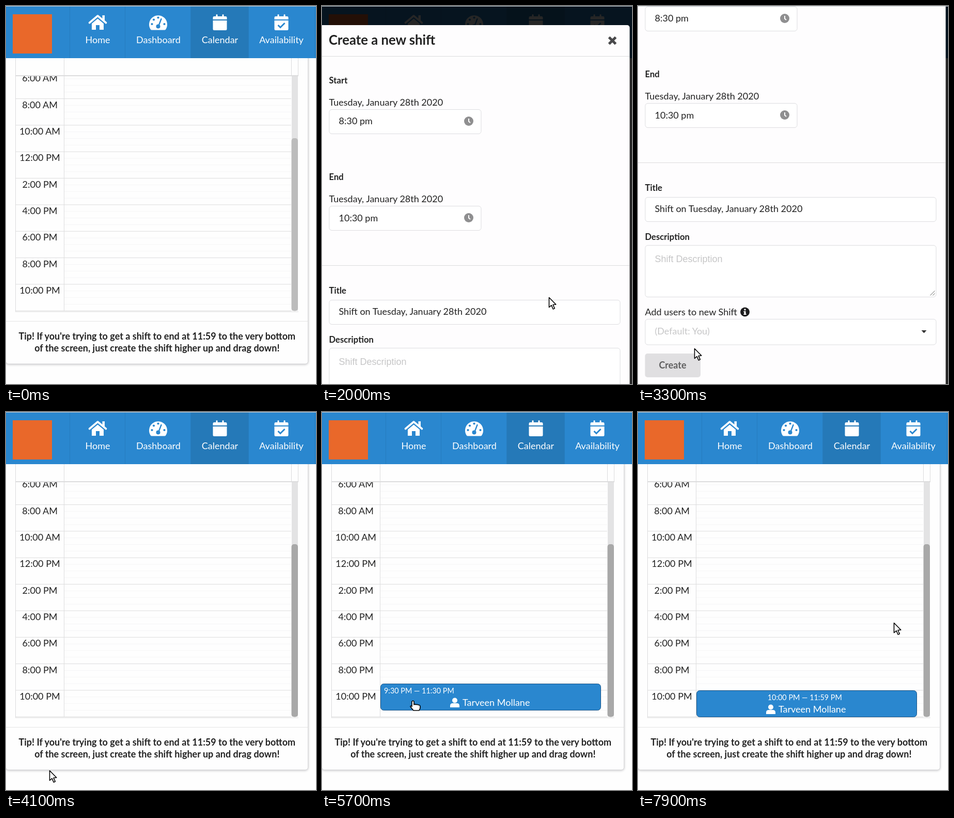
An HTML page that plays this animation: 600x732 px, repeating every 8000 ms.

```html
<!DOCTYPE html>
<html lang="en">
<head>
<meta charset="utf-8">
<title>Creating a shift</title>
<style>
  html, body { margin: 0; width: 100%; height: 100%; overflow: hidden; background: #fefefe; }
  svg { display: block; width: 600px; height: 732px; }
  text { font: 18px Lato, Carlito, sans-serif; fill: #222; white-space: pre; }
  .mid { text-anchor: middle; }
  .bold { font-weight: 700; }
  .label { font-size: 16.7px; font-weight: 700; }
  .title { font-size: 25.7px; font-weight: 700; }
  .hint { fill: #c6c6c7; }
  .area { font-family: "Liberation Sans", Arial, sans-serif; }
  .white text, text.white { fill: #fff; }
  .white { fill: #fff; }
  .blue { fill: #2a87cf; }
  .rule { stroke: #dcdcdd; fill: none; }
  .slot { stroke: #f5f5f6; }
  .field { fill: #fff; stroke: #dddde0; }
  .tool { fill: #fff; stroke: #000; stroke-width: 1.6; stroke-linejoin: round; }
  #card { filter: drop-shadow(0 1px 2px #c4c4c6); }
  #range { font-size: 13.5px; }
  #when { font-size: 14.4px; }
</style>
</head>
<body>
<svg viewBox="0 0 600 732">
  <defs>
    <g id="clock">
      <circle r="9" fill="#8f8f90"/>
      <path d="M0-5V.5L3 3" fill="none" stroke="#fff" stroke-width="2"/>
    </g>
    <path id="day" d="M2.500 4H6V1.500Q6 0 7.500 0T9 1.500V4H18V1.500Q18 0 19.500 0T21 1.500V4H24.500Q27 4 27 6.500V10H0V6.500Q0 4 2.500 4ZM0 12H27V28.500Q27 31 24.500 31H2.500Q0 31 0 28.500Z"/>
    <path id="grip" d="M-6 0H7M-6 3H7" stroke="#fff" stroke-opacity=".85"/>
  </defs>

  <rect width="600" height="732" fill="#fefefe"/>
  <rect id="card" x="-.5" y="60" width="585" height="633" rx="5" fill="#fefefe" stroke="#d6d6d8"/>
  <path class="rule" d="M0 610.500H584" opacity=".75"/>
  <g class="mid">
    <text class="bold" x="292.300" y="645.500">Tip! If you're trying to get a shift to end at 11:59 to the very bottom</text>
    <text class="bold" x="292.300" y="668.500">of the screen, just create the shift higher up and drag down!</text>
  </g>

  <g id="grid"></g>
  <rect x="553" y="136" width="12" height="454" fill="#e3e3e4"/>
  <rect id="thumb" x="552.500" y="256" width="12.500" height="334.500" rx="5"/>

  <g id="pick">
    <rect id="pickBox" x="113" width="439" fill="#7d7b7e"/>
    <text id="range" class="mid white" x="332.500" y="521.400"></text>
  </g>

  <g id="shift" class="white">
    <rect class="blue" x="113.500" y=".5" width="426" height="51" rx="6" stroke="#1b5587"/>
    <text id="when" y="19.300"></text>
    <circle cx="257" cy="32.500" r="5"/>
    <path d="M248 46V43Q248 38 253 38H261Q266 38 266 43V46Z"/>
    <text x="272" y="43.200">Tarveen Mollane</text>
    <g id="grips">
      <use href="#grip" x="325" y="4.500"/>
      <use href="#grip" x="325" y="44.500"/>
    </g>
  </g>

  <rect x="19" y="101" width="546" height="34" fill="#fefefe"/>
  <path class="rule" d="M18.500 101V592M565.500 101V135M552.500 101V135M112.500 101V590M18 592H566"/>
  <path class="rule" d="M18 135H566" stroke-width="2"/>

  <g class="white">
    <rect class="blue" width="600" height="101"/>
    <rect x="358" width="111" height="101" fill="#2579b8"/>
    <path d="M123.500 0V101M230.500 0V101M357.500 0V101M469.500 0V101M597.500 0V101" stroke="#000" stroke-opacity=".08"/>
    <rect x="13" y="16" width="76" height="76" fill="#e9682a"/>
    <path d="M161.500 32.500L177.500 19 193.500 32.500" fill="none" stroke="#fff" stroke-width="3.600" stroke-linecap="round" stroke-linejoin="round"/>
    <path d="M186.500 18H191V29L186.500 25ZM166 34L177.500 24.500 189 34V46H181V37H174V46H166Z"/>
    <path d="M280 45.500A17.500 17.500 0 1 1 309 45.500Q308.500 46.500 307 46.500H282Q280.500 46.500 280 45.500Z"/>
    <g class="blue">
      <circle cx="282.500" cy="35" r="2.100"/>
      <circle cx="286" cy="26.500" r="2.100"/>
      <circle cx="294.500" cy="22.500" r="2.100"/>
      <circle cx="306.500" cy="35" r="2.100"/>
      <circle cx="294.500" cy="39.500" r="4"/>
      <path d="M295.500 38L300.500 25" stroke="#2a87cf" stroke-width="2.400" stroke-linecap="round"/>
    </g>
    <use href="#day" x="400.500" y="16"/>
    <use href="#day" x="519.500" y="16"/>
    <path d="M526.500 37L531 41.500 539.500 33" fill="none" stroke="#2a87cf" stroke-width="3"/>
    <g class="mid">
      <text x="177.500" y="71.500">Home</text>
      <text x="295" y="71.500">Dashboard</text>
      <text x="414" y="71.500">Calendar</text>
      <text x="533" y="71.500">Availability</text>
    </g>
  </g>

  <g id="dialog">
    <rect width="600" height="732" fill="#000" opacity=".85"/>
    <g id="sheet">
      <rect x="-6" y="37" width="601.500" height="960" rx="5" fill="#fefdfe"/>
      <text class="title" x="13" y="74.500">Create a new shift</text>
      <path d="M555.500 60.500L568.500 73.500M568.500 60.500L555.500 73.500" stroke="#48484a" stroke-width="5"/>
      <path class="rule" d="M0 97.500H595M0 502.500H595"/>

      <text class="label" x="13.500" y="150.300">Start</text>
      <text x="13.500" y="192.500">Tuesday, January 28th 2020</text>
      <rect class="field" x="14" y="200.500" width="294" height="47" rx="5"/>
      <text x="32.500" y="229">8:30 pm</text>
      <use href="#clock" x="284" y="223"/>

      <text class="label" x="13.500" y="337.300">End</text>
      <text x="13.500" y="379.500">Tuesday, January 28th 2020</text>
      <rect class="field" x="14" y="387.500" width="294" height="47" rx="5"/>
      <text x="32.500" y="416.500">10:30 pm</text>
      <use href="#clock" x="284" y="410"/>

      <text class="label" x="13.500" y="557">Title</text>
      <rect class="field" x="14" y="569.500" width="563" height="47" rx="5"/>
      <text x="32.500" y="597.500">Shift on Tuesday, January 28th 2020</text>

      <text class="label" x="13.500" y="651.500">Description</text>
      <rect class="field" x="14" y="662.500" width="563" height="100" rx="5"/>
      <text class="hint area" x="32.500" y="694.500">Shift Description</text>
      <path d="M565.500 759.500L574.500 750.500M570.500 759.500L574.500 755.500" stroke="#666"/>

      <text x="13.500" y="798">Add users to new Shift</text>
      <circle cx="207" cy="791.500" r="9" fill="#1c1c1d"/>
      <path class="white" d="M205.500 785.500H208.500V788.500H205.500ZM204.500 790H208.500V795H209.500V797H204.500V795H205.500V792H204.500Z"/>
      <rect class="field" x="14" y="805.500" width="563" height="49.500" rx="5"/>
      <text class="hint" x="32.500" y="835">(Default: You)</text>
      <path d="M548.500 827H558.500L553.500 832.500Z" fill="#333"/>

      <rect id="create" x="13.500" y="872" width="107.500" height="46" rx="5"/>
      <text class="bold mid" x="67" y="900.800" fill-opacity=".68">Create</text>
    </g>
  </g>

  <path d="M0 .5H600" stroke="#c9d1d6"/>
  <g id="cursor">
    <path id="arrow" class="tool" d="M.500 .5V19.500L5 15.600 8.300 23 11.300 21.600 8 14.500 13.800 14Z"/>
    <path id="hand" class="tool" d="M-2 1.500Q0-1 2 1.500V8Q4 5.800 6 8Q8 6.200 10 8.500Q13 7.500 14 10.500V14.500L12 19H1L-5 11.500Q-4.500 8.500-2 11.500Z"/>
    <g id="fist">
      <path class="tool" d="M-6 2V0Q-4-4-2-1.500Q0-4.500 2-2Q5-3.500 6-.5Q9-1 9.500 2V8L7 12.500H-6L-9.500 6Q-10 2-6 2Z"/>
      <path d="M-4 6H-2M0 6H2M4 6H6" stroke="#777"/>
    </g>
  </g>
</svg>
<script>
const LOOP = 8000, STEP = 100;
const HOUR = 25.675, HALF = HOUR / 2;
const $ = id => document.getElementById(id);
const show = (id, on) => $(id).style.display = on ? "" : "none";
const move = (id, x, y) => $(id).setAttribute("transform", `translate(${x} ${y})`);
const yAt = hour => 179.5 + (hour - 8) * HOUR;

// keys: [time, ...values], linear between neighbours
function track(t, keys) {
  if (t <= keys[0][0]) return keys[0].slice(1);
  const i = keys.findIndex(k => k[0] > t);
  if (i < 0) return keys[keys.length - 1].slice(1);
  const [a, b] = [keys[i - 1], keys[i]];
  const p = (t - a[0]) / (b[0] - a[0]);
  return a.slice(1).map((v, n) => v + (b[n + 1] - v) * p);
}

function clock(hour) {
  if (hour >= 24) return "11:59 PM";
  return `${Math.floor(hour) % 12 || 12}:${hour % 1 ? "30" : "00"} ${hour < 12 ? "AM" : "PM"}`;
}
const span = (from, to) => `${clock(from)} — ${clock(to)}`;

function buildGrid() {
  let out = "";
  for (let h = 6; h <= 24; h += 2) {
    const y = yAt(h);
    if (h > 6) out += `<path class="rule" d="M19 ${y}H552"/>`;
    if (h === 24) break;
    for (let n = 1; n < 4; n++) out += `<path class="slot" d="M113 ${y + n * HALF}H552"/>`;
    out += `<text class="mid" x="65.5" y="${y + 18}">${clock(h)}</text>`;
  }
  $("grid").innerHTML = out;
}

const POINTER = [
  [300, 540, 440], [800, 437, 505], [1000, 437, 505], [1300, 437, 547], [1600, 439, 564],
  [2400, 439, 564], [3100, 109, 663], [3300, 109, 663], [3500, 84, 694], [4200, 84, 694],
  [5000, 173, 530], [5400, 173, 530], [5700, 176, 559], [6000, 178, 574],
  [6800, 178, 574], [7600, 495, 408]
];
const SCROLL = [[2300, 0], [2800, 199]];
const THUMB = [[0, 188], [500, 168]];

function drawPick(t, y) {
  const on = t >= 1000 && t < 1900;
  show("pick", on);
  if (!on) return;
  const start = 20.5;
  const end = Math.max(21, 8 + Math.floor((y - 179.5) / HALF) / 2);
  const top = yAt(start);
  $("pickBox").setAttribute("y", top);
  $("pickBox").setAttribute("height", yAt(end) - top);
  $("range").textContent = span(start, end);
}

// Returns true while the pointer is over the shift.
function drawShift(t, x, y) {
  const on = t >= 4500;
  show("shift", on);
  if (!on) return false;
  const dragging = t > 5400 && t < 6400;
  const moved = dragging ? Math.max(0, Math.floor((y - 530) / HALF)) / 2 : t < 6400 ? 0 : 1.5;
  const start = 20.5 + moved;
  const top = Math.round(yAt(start) + .3);
  const over = x > 113 && x < 540 && y >= top && y < top + 52;
  move("shift", 0, top);
  const when = $("when");
  when.textContent = span(start, start + 2);
  when.setAttribute("x", dragging ? 120 : 322.8);
  when.setAttribute("text-anchor", dragging ? "start" : "middle");
  show("grips", over && !dragging);
  return over;
}

function draw(t) {
  const [x, y] = track(t, POINTER);
  const [scroll] = track(t, SCROLL);
  const [tone] = track(t, THUMB);
  $("thumb").setAttribute("fill", `rgb(${tone},${tone},${tone})`);

  drawPick(t, y);
  const over = drawShift(t, x, y);

  show("dialog", t >= 1900 && t < 4000);
  move("sheet", 0, -scroll);
  const hot = x < 105 && y > 673;
  $("create").setAttribute("fill", hot ? "#cacbcd" : "#e0dfe1");

  const fist = t >= 1000 && t < 1900;
  show("cursor", t >= 300);
  move("cursor", x, y);
  show("fist", fist);
  show("hand", over);
  show("arrow", !fist && !over);
}

buildGrid();
const begin = performance.now();
function tick() {
  const t = (performance.now() - begin) % LOOP;
  draw(Math.floor(t / STEP) * STEP);
  requestAnimationFrame(tick);
}
tick();
</script>
</body>
</html>
```
